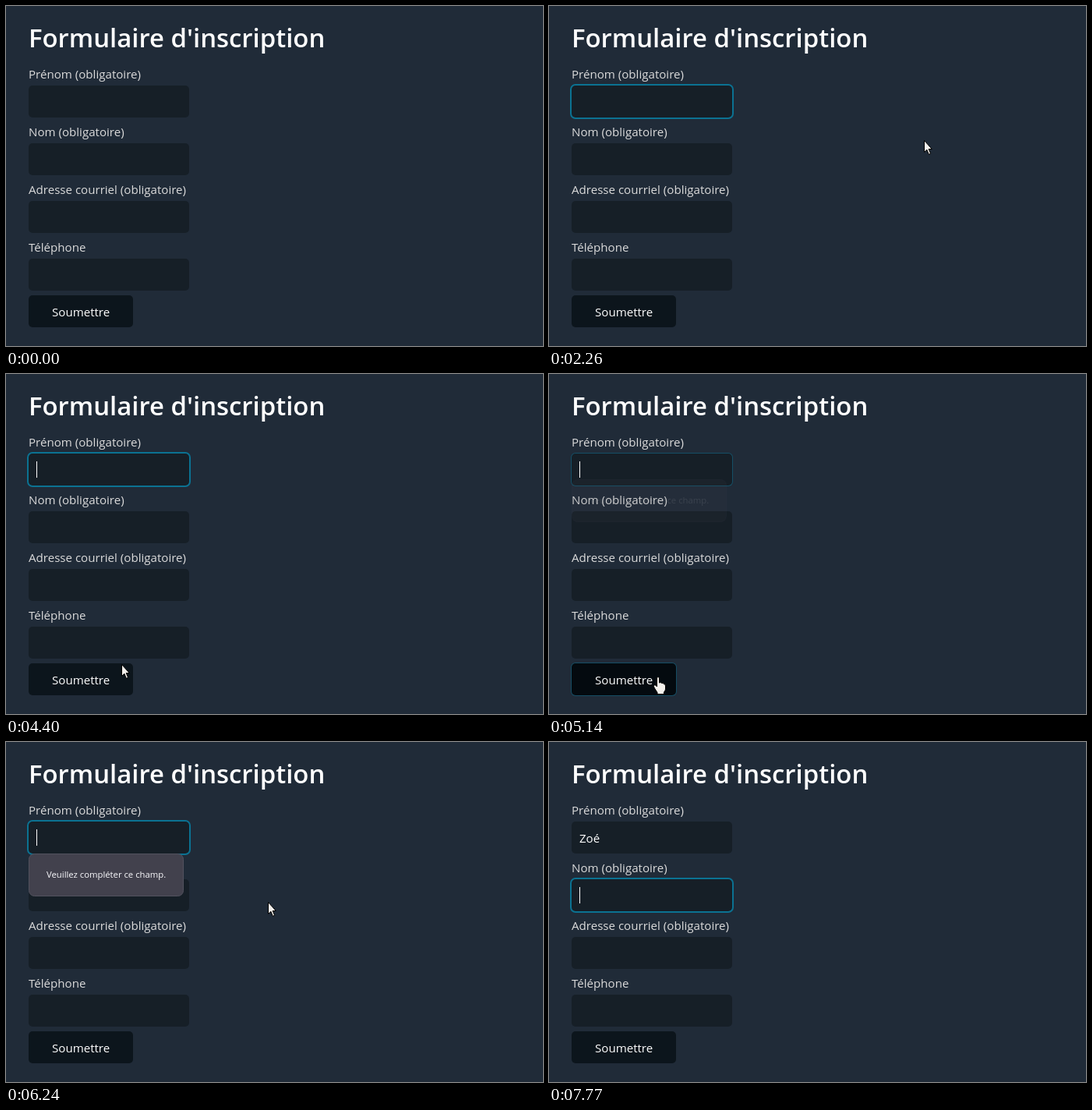
Write an HTML page with a canvas that moves like this. It is 689 px wide and 436 px high and loops after 8 s.

```html
<!DOCTYPE html>
<html lang="fr">
<head>
<meta charset="utf-8">
<title>Formulaire d'inscription</title>
<style>
  html, body { margin: 0; width: 100%; height: 100%; overflow: hidden; background: #202b38; }
  canvas { display: block; }
</style>
</head>
<body>
<canvas id="stage" width="689" height="436"></canvas>
<script>
const LOOP = 8000;
const ctx = document.getElementById('stage').getContext('2d');
const FONT = '"Open Sans", "Noto Sans", sans-serif';
const BODY = `500 15.1px ${FONT}`;

const RADIUS = 5;
const FIELD = { x: 29, w: 206, h: 41 };
const FIELD_Y = [102, 176, 250, 324];
const LABELS = ['Prénom (obligatoire)', 'Nom (obligatoire)', 'Adresse courriel (obligatoire)', 'Téléphone'];
const BUTTON = { x: 29, y: 371, w: 134, h: 41 };

// Pointer moves: start time, number of steps, from, to, upward bow
const STEP = 67.5;
const MOVES = [
  [260, 11, [638, 450], [98, 126], 56],
  [1995, 4, [98, 126], [481, 172], 0],
  [4130, 5, [481, 172], [148, 372], 0],
  [4467, 4, [148, 372], [140, 388], 0],
  [5820, 7, [140, 388], [336, 205], 0],
  [6440, 3, [336, 205], [308, 205], 0]
];
const POINTER_HIDDEN = 6770;
const CARET_ON = [[1740, 2260], [2790, 3340], [3870, 4850], [5090, 5620], [6150, 7600]];
const TYPED = [[7430, 'Zoé'], [7300, 'Zo'], [6770, 'Z']];

const clamp = v => Math.max(0, Math.min(1, v));
const ramp = (t, start, length = 100) => clamp((t - start) / length);

function box(x, y, w, h, r, fill) {
  ctx.beginPath();
  ctx.roundRect(x, y, w, h, r);
  ctx.fillStyle = fill;
  ctx.fill();
}

function text(str, x, y, font, fill) {
  ctx.font = font;
  ctx.fillStyle = fill;
  ctx.fillText(str, x, y);
}

// Focus ring: spread and opacity grow together
function ring(x, y, w, h, p) {
  if (p <= 0) return;
  const s = 2 * p;
  box(x - s, y - s, w + 2 * s, h + 2 * s, RADIUS + s, `rgba(0,150,191,${0.67 * p})`);
}

function caret(x, y) {
  ctx.fillStyle = '#fff';
  ctx.fillRect(x, y + 10, 1, 21);
}

function drawFields(t) {
  const rings = [
    ramp(t, 1700) - ramp(t, 4830) + ramp(t, 5090) - ramp(t, 7590),
    ramp(t, 7590)
  ];
  FIELD_Y.forEach((y, i) => {
    text(LABELS[i], 29, y - 9, BODY, '#dbdbdb');
    ring(FIELD.x, y, FIELD.w, FIELD.h, rings[i] || 0);
    box(FIELD.x, y, FIELD.w, FIELD.h, RADIUS, '#161f27');
  });

  const entry = TYPED.find(([start]) => t >= start);
  const value = entry ? entry[1] : '';
  text(value, 39, FIELD_Y[0] + 27, BODY, '#fff');
  if (CARET_ON.some(([a, b]) => t >= a && t < b)) {
    caret(39 + Math.round(ctx.measureText(value).width), FIELD_Y[0]);
  }
  if (t >= 7630) caret(39, FIELD_Y[1]);
}

function drawButton(t) {
  const hover = ramp(t, 4440) - ramp(t, 5830);
  const mix = (a, b) => Math.round(a + (b - a) * hover);
  const y = BUTTON.y + (t >= 4840 && t < 5080 ? 2 : 0);
  ring(BUTTON.x, y, BUTTON.w, BUTTON.h, ramp(t, 4830) - ramp(t, 5090));
  box(BUTTON.x, y, BUTTON.w, BUTTON.h, RADIUS, `rgb(${mix(12, 4)},${mix(21, 10)},${mix(28, 15)})`);
  text('Soumettre', 59, y + 27, BODY, '#fff');
}

function drawTooltip(t) {
  const p = ramp(t, 5120, 200);
  if (p <= 0 || t >= 6770) return;
  ctx.save();
  ctx.globalAlpha = p;
  ctx.translate(0, -10 * (1 - p) ** 2);
  box(29.5, 143.5, 198, 54, 7, '#42414d');
  ctx.strokeStyle = '#52525e';
  ctx.lineWidth = 1;
  ctx.stroke();
  text('Veuillez compléter ce champ.', 52, 174, `500 11.3px ${FONT}`, '#fbfbfe');
  ctx.restore();
}

function pointerAt(t) {
  if (t < MOVES[0][0] || t >= POINTER_HIDDEN) return null;
  const [start, n, from, to, bow] = MOVES.filter(m => t >= m[0]).pop();
  const k = Math.min(n, Math.floor((t - start) / STEP) + 1) / n;
  const [x, y] = from.map((v, i) => v + (to[i] - v) * k);
  return [Math.round(x), Math.round(y - 4 * bow * k * (1 - k))];
}

function outline(path) {
  const p = new Path2D(path);
  ctx.fillStyle = '#f4f1ec';
  ctx.strokeStyle = '#000';
  ctx.lineWidth = 1;
  ctx.lineJoin = 'round';
  ctx.fill(p);
  ctx.stroke(p);
}

const ARROW = 'M.5 .5V15.5L3.9 12.3L6.3 18.3L8.6 17.3L6.2 11.5H10.3Z';
const HAND = 'M-1.5 1.5Q0 -.5 1.5 1.5V8Q3.5 6.8 4.6 8.6Q6.6 7.8 7.2 9.6Q9.5 9.2 9.5 12'
  + 'V16Q9.5 18 7.5 20V22.5H-1V20.5L-4.5 15L-5.8 12.2Q-5 9.8 -3 11.2L-1.5 13Z';

function drawBeam() {
  ctx.fillStyle = '#f4f1ec';
  for (const y of [-8, 7]) {
    ctx.fillRect(-4, y, 3, 1);
    ctx.fillRect(0, y, 3, 1);
  }
  ctx.fillRect(-1, -7, 1, 14);
}

function drawPointer(t) {
  const pos = pointerAt(t);
  if (!pos) return;
  const [x, y] = pos;
  const inside = (b, top) => x >= b.x && x < b.x + b.w && y >= top && y < top + b.h;
  ctx.save();
  ctx.translate(x, y);
  if (FIELD_Y.some(top => inside(FIELD, top))) drawBeam();
  else outline(inside(BUTTON, BUTTON.y + 3) ? HAND : ARROW);
  ctx.restore();
}

function draw(t) {
  ctx.fillStyle = '#202b38';
  ctx.fillRect(0, 0, 689, 436);
  text("Formulaire d'inscription", 29, 53, `600 32.9px ${FONT}`, '#fff');
  drawFields(t);
  drawButton(t);
  drawTooltip(t);
  drawPointer(t);
}

function tick() {
  draw(performance.now() % LOOP);
  requestAnimationFrame(tick);
}
tick();
</script>
</body>
</html>
```
